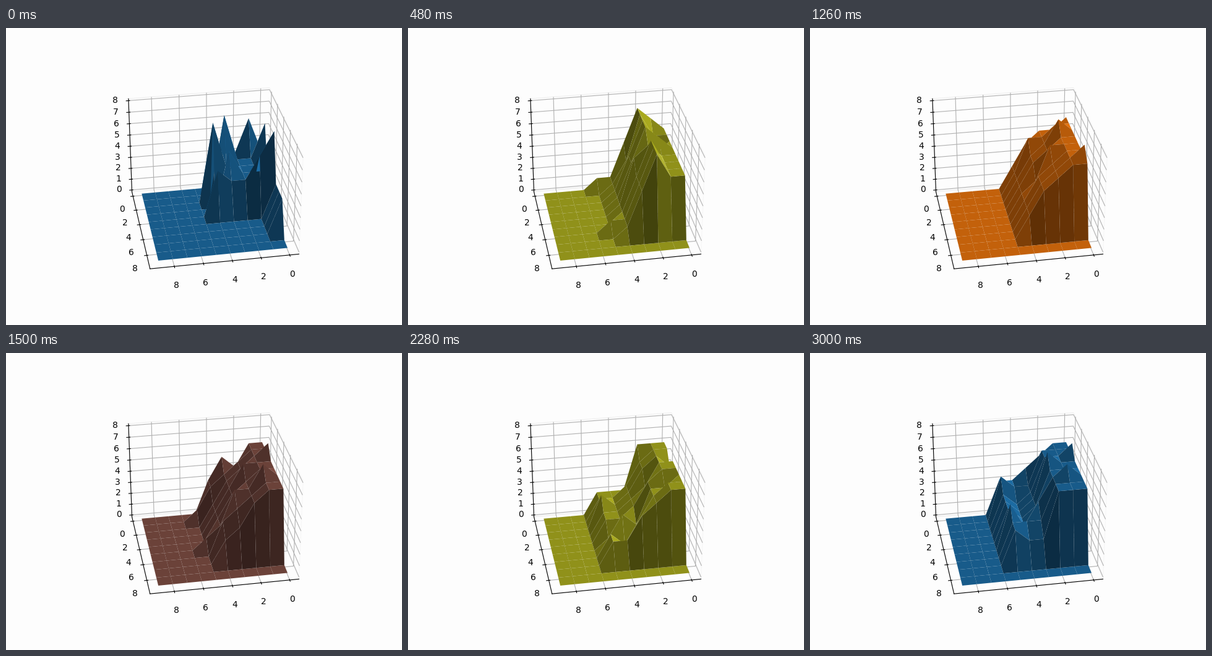
A matplotlib script that plays this animation: 640x480 px, repeating every 3.06 s.

```python
import numpy as np
import matplotlib.pyplot as plt
from matplotlib.animation import FuncAnimation

N = 10
SIDE = 8        # sand never passes this row
FRAMES = 51
SETTLE = 8      # frames until the first peaks have slumped into a ridge
CYCLE = 25      # frames between two grains landing on the same cell
PAPER = "#fdfdfd"

X, Y = np.meshgrid(np.arange(N), np.arange(N))

# Ridge cross-section, from x = 0 outwards, at a few moments
TIMES = (8, 33, 43, 50)
RIDGE = np.array([(5, 5, 7, 4, 1, 0),
                  (6.5, 6, 4, 3.3, 2, 0),
                  (6, 6, 5, 3, 2, 3),
                  (6, 6, 6, 3, 2, 3)])
WIDTH = RIDGE.shape[1]

phase = np.random.default_rng(7).random((SIDE, WIDTH))


def first_peaks():
    """Square block of sand with a spill along x = 0 and a few tall spikes."""
    z = np.where((X < 4) & (Y < 5) | (X == 0) & (Y < SIDE), 3.0, 0.0)
    for x, y, top in ((1, 0, 6), (0, 1, 6), (3, 1, 7), (4, 2, 7), (3, 3, 5),
                      (0, 4, 7), (1, 4, 5), (4, 4, 4)):
        z[y, x] = top
    return z


def ridge(i):
    """The cross-section extruded along y, with loose grains and gaps."""
    profile = [np.interp(i, TIMES, column) for column in RIDGE.T]
    wave = np.sin(2 * np.pi * (phase + i / CYCLE))
    grains = (wave > 0.92).astype(int) - (wave < -0.97)
    z = np.zeros((N, N))
    z[:SIDE, :WIDTH] = np.maximum(np.floor(np.add(profile, 0.5)) + grains, 0)
    return z


start = first_peaks()


def heights(i):
    t = min(i / SETTLE, 1)
    return np.floor((1 - t) * start + t * ridge(i) + 0.5)


def padded(lo, hi):
    pad = (hi - lo) / 48
    return lo - pad, hi + pad


fig = plt.figure(figsize=(6.4, 4.8), dpi=100, facecolor=PAPER)
ax = fig.add_subplot(projection="3d", facecolor=PAPER)
ax.view_init(elev=30, azim=80)
ax.set(xlim=padded(-0.45, 9.45), ylim=padded(-0.45, 9.45), zlim=padded(0, 8),
       xticks=range(0, 9, 2), yticks=range(0, 9, 2), zticks=range(9))
for axis in (ax.xaxis, ax.yaxis, ax.zaxis):
    axis.pane.set_facecolor(PAPER)

surface = None


def draw(i):
    global surface
    if surface is not None:
        surface.remove()
    surface = ax.plot_surface(X, Y, heights(i), color=f"C{i % 10}")
    return surface,


anim = FuncAnimation(fig, draw, frames=FRAMES, interval=60, repeat=True, repeat_delay=0)
plt.show()
```
